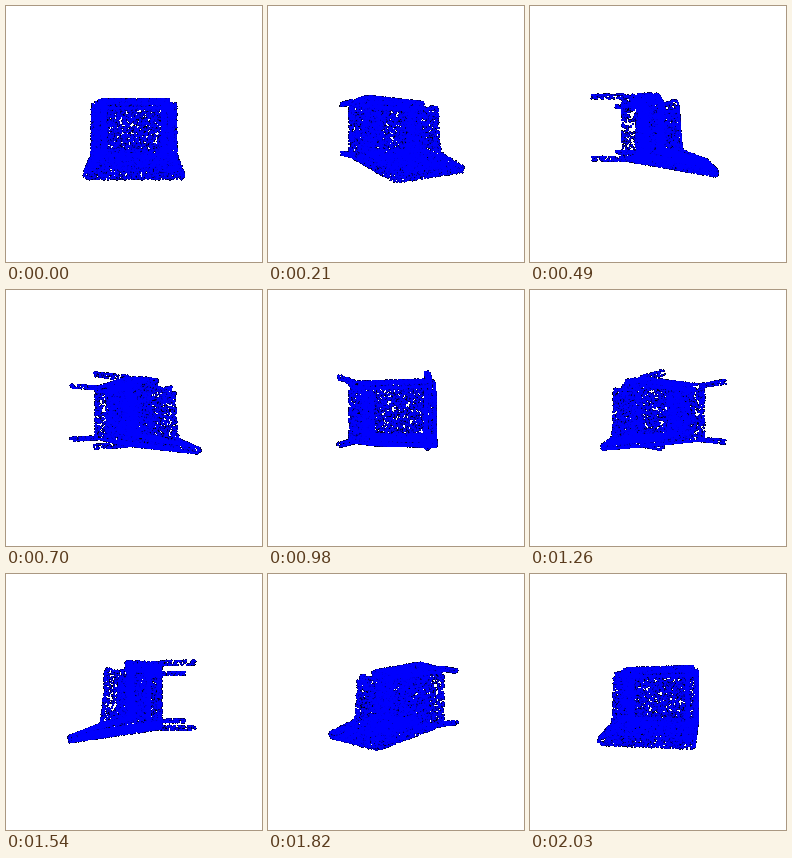
Recreate the animation shown at these times as a matplotlib script. Size 256 px wide and 256 px high, loop 2.1 s.

```python
import numpy as np
import matplotlib.pyplot as plt
from matplotlib.animation import FuncAnimation
from matplotlib.path import Path

SIZE, FRAMES, INTERVAL = 256, 30, 70
DIST = 3.0
FOCAL = SIZE / 2 / np.tan(np.radians(30))
RADIUS = 0.01 * SIZE / 2
DENSITY = 1400  # points per unit of surface

rng = np.random.default_rng(7)
cloud = []


def add(a, v, u):
    cloud.append(np.column_stack(np.broadcast_arrays(a, v, u)))


def extrude(profile, a0, a1):
    """Sweep a (u, v) polyline sideways from a0 to a1."""
    for p, q in zip(profile, profile[1:]):
        p, q = np.array(p), np.array(q)
        n = int(DENSITY * np.hypot(*(q - p)) * abs(a1 - a0))
        uv = p + rng.random((n, 1)) * (q - p)
        add(a0 + (a1 - a0) * rng.random(n), uv[:, 1], uv[:, 0])


def panel(outline, a):
    """Flat (u, v) polygon standing at side position a."""
    pts = np.array(outline)
    lo, hi = pts.min(0), pts.max(0)
    n = int(DENSITY * np.prod(hi - lo))
    uv = lo + rng.random((n, 2)) * (hi - lo)
    uv = uv[Path(pts).contains_points(uv)]
    add(a, uv[:, 1], uv[:, 0])


def rect(u0, u1, v0, v1):
    return [(u0, v0), (u1, v0), (u1, v1), (u0, v1)]


def leg(a, v, half=0.022):
    box = rect(-0.73, -0.34, v - half, v + half)
    extrude(box + box[:1], a - half, a + half)
    for s in (-half, half):
        panel(box, a + s)


# The chair lies on its back: u points from the feet to the top of the back.
arm = [(0.03, -0.36), (0.19, -0.355), (0.22, -0.38), (0.26, -0.38),
       (0.28, -0.34), (0.29, -0.14), (0.31, 0.10), (0.33, 0.24),
       (0.40, 0.28), (0.71, 0.395)]
side = [(-0.36, -0.44), (0.0, -0.44)] + arm + [(0.71, 0.47), (-0.36, 0.30)]

for s in (-1, 1):
    panel(side, s * 0.52)
    panel(rect(-0.2, 0.28, -0.36, 0.25), s * 0.40)
    panel(rect(-0.36, -0.31, -0.44, 0.30), s * 0.47)
    panel(rect(-0.2, 0.05, -0.468, -0.36), s * 0.47)
    extrude(arm, s * 0.40, s * 0.52)
    extrude([(-0.36, -0.44), (-0.36, 0.30)], s * 0.47, s * 0.52)
    for v in (-0.438, 0.29):
        leg(s * 0.468, v)

extrude([(-0.36, -0.45), (-0.05, -0.468), (0.05, -0.468), (0.05, -0.36)],
        -0.47, 0.47)
extrude([(0.05, -0.36), (0.03, 0.21)], -0.40, 0.40)
extrude([(-0.2, -0.44), (-0.2, 0.30)], -0.50, 0.50)
extrude([(-0.36, -0.38), (-0.15, -0.38)], -0.46, 0.46)
extrude([(0.0, 0.21), (0.71, 0.395)], -0.50, 0.50)
extrude([(0.71, 0.395), (0.71, 0.47), (-0.36, 0.30)], -0.52, 0.52)
A, V, U = np.vstack(cloud).T


def render(angle):
    """Splat soft discs; thin coverage darkens, no coverage stays white."""
    c, s = np.cos(angle), np.sin(angle)
    scale = FOCAL / (DIST - (U * c - A * s))
    x = SIZE / 2 + (A * c + U * s) * scale
    y = SIZE / 2 + V * scale
    col, row = np.floor(x).astype(int), np.floor(y).astype(int)
    log_clear = np.zeros(SIZE * SIZE)
    for dx in range(-2, 3):
        for dy in range(-2, 3):
            i, j = col + dx, row + dy
            w = 1 - ((i + 0.5 - x) ** 2 + (j + 0.5 - y) ** 2) / RADIUS ** 2
            hit = w > 0
            log_clear += np.bincount(j[hit] * SIZE + i[hit],
                                     np.log(np.maximum(1 - w[hit], 1e-6)),
                                     SIZE * SIZE)
    img = np.ones((SIZE * SIZE, 3))
    covered = log_clear < 0
    img[covered, :2] = 0
    img[covered, 2] = 1 - np.exp(log_clear[covered])
    return img.reshape(SIZE, SIZE, 3)


fig = plt.figure(figsize=(SIZE / 100, SIZE / 100), dpi=100, facecolor="white")
ax = fig.add_axes([0, 0, 1, 1])
ax.axis("off")
view = ax.imshow(render(0), interpolation="nearest", aspect="auto")


def update(k):
    view.set_data(render(2 * np.pi * k / FRAMES))
    return [view]


anim = FuncAnimation(fig, update, frames=FRAMES, interval=INTERVAL,
                     repeat=True, repeat_delay=0)
plt.show()
```
